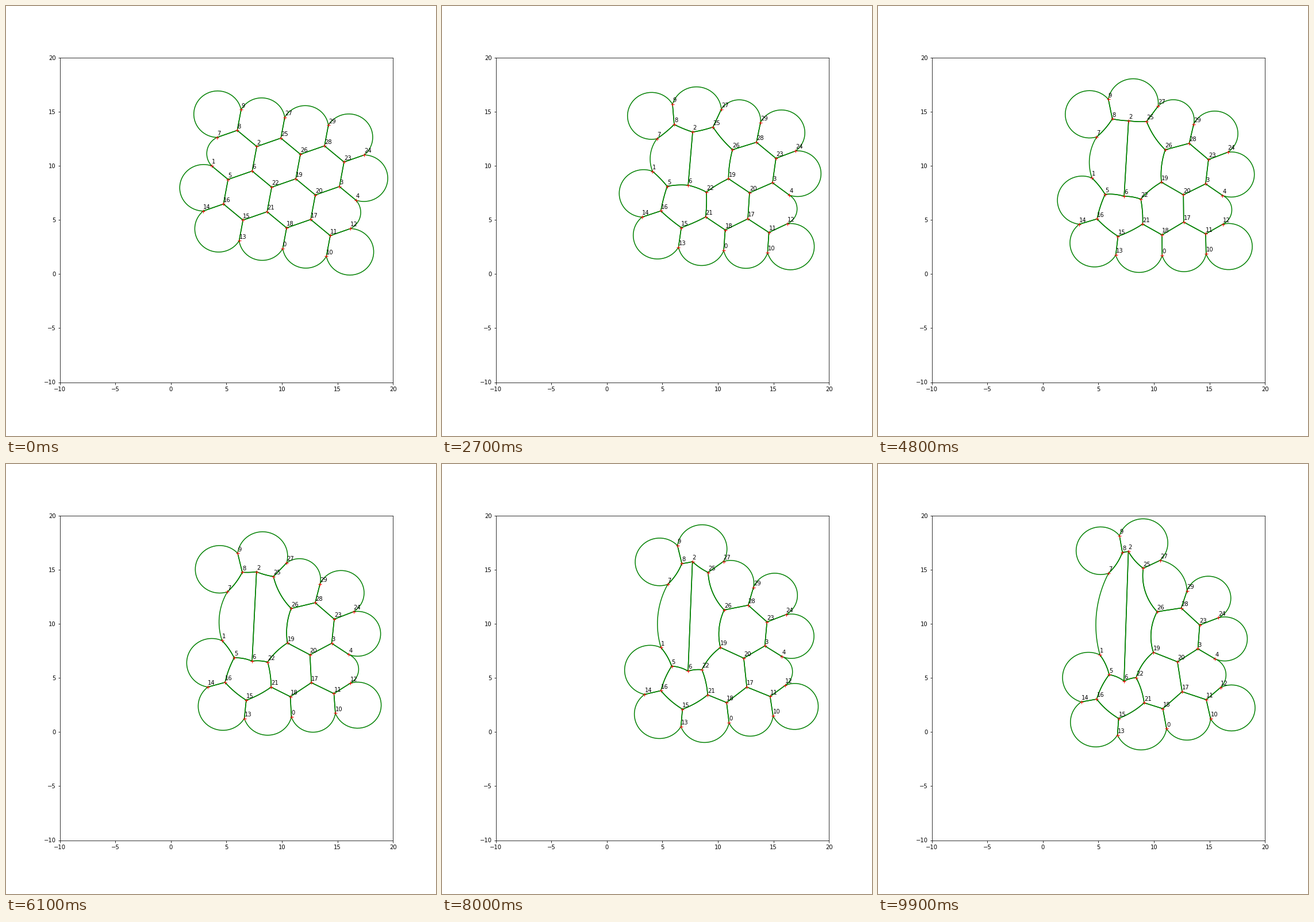
Animation, 748 px wide and 748 px high, one loop 10000 ms. Source, as a matplotlib script:

```python
import numpy as np
import matplotlib.pyplot as plt
from matplotlib.animation import FuncAnimation

SIZE, DPI, FRAMES = 748, 72, 100
SIDE, TILT = 2.305, np.radians(79.67)
CENTRE = 11.25 + 8.80j
STUB = .84              # length of the open edges on the rim, in sides
CELL_AREA = 14.25
PRESSURE = .5
PULLED = (2, 6)         # this pair is dragged apart at constant speed

# The three edge directions of the honeycomb.
up, right_down, left = SIDE * np.exp(1j * (TILT + np.radians([0, -120, 120])))
directions = (up, right_down, left)
column = right_down - left

# Two interleaved 3 x 3 grids of junctions, then the stubs around them.
even_rows = [((8, 25, 28), up - right_down), ((6, 19, 3), 0),
             ((16, 21, 17), left - up)]
odd_rows = [((2, 26, 23), up), ((5, 22, 20), left),
            ((15, 18, 11), left - up + right_down)]
stubs = [(8, 9, up), (25, 27, up), (28, 29, up), (15, 13, -up), (18, 0, -up),
         (11, 10, -up), (8, 7, left), (16, 14, left), (23, 24, -left),
         (11, 12, -left), (3, 4, right_down), (5, 1, -right_down)]

start = np.zeros(30, complex)
centres = []
for rows, sign in ((even_rows, -1), (odd_rows, 1)):
    for names, offset in rows:
        for k, name in enumerate(names):
            start[name] = CENTRE + offset + (k - 1) * column
            centres += [start[name] + sign * d for d in directions]
for base, tip, step in stubs:
    start[tip] = start[base] + STUB * step

# Where each junction comes to rest.
end = np.array([
    11.14 + .31j, 5.14 + 7.13j, 7.70 + 16.69j, 13.96 + 7.69j, 15.51 + 6.76j,
    5.97 + 5.30j, 7.31 + 4.71j, 5.91 + 14.67j, 7.16 + 16.61j, 6.90 + 18.15j,
    15.10 + 1.24j, 14.71 + 2.99j, 15.98 + 4.10j, 6.72 - .28j, 3.46 + 2.78j,
    6.82 + 1.26j, 4.85 + 3.04j, 12.54 + 3.73j, 10.80 + 2.16j, 9.95 + 7.37j,
    12.12 + 6.49j, 9.12 + 2.70j, 8.40 + 5.03j, 14.12 + 9.89j, 15.82 + 10.56j,
    9.04 + 15.13j, 10.29 + 11.12j, 10.57 + 15.87j, 12.46 + 11.46j,
    12.98 + 13.05j])

# A cell is the clockwise loop of junctions around one honeycomb centre.
loops = {}
for c in centres:
    near = np.flatnonzero(abs(start - c) < 1.2 * SIDE)
    loop = [int(i) for i in near[np.argsort(-np.angle(start[near] - c))]]
    loops[frozenset(loop)] = loop
cells = list(loops.values())


def edges(cell):
    return list(zip(cell, cell[1:] + cell[:1]))


owner = {edge: k for k, cell in enumerate(cells) for edge in edges(cell)}


def junctions(t):
    """Straight drift, plus two swings that fade out again."""
    sway = .015 * (1 - np.exp(-4 * t) - t * (1 - np.exp(-4))) / .38
    curl = .2 * 4 * t * (1 - t)
    pts = start + (end - start) * t
    swing = 1j * sway * (start - (-14.2 + 12.5j))
    corner = [7, 8, 9, 25]
    swing[corner] += 1j * curl * (start[corner] - (10.26 + 11.86j))
    swing[list(PULLED)] = 0
    return pts + swing


def pressure(cell, t):
    """Cells along the pulled wall slacken, the one below is squeezed."""
    slack = np.exp(-t / .6)
    if all(p in cell for p in PULLED):
        return PRESSURE * slack
    if PULLED[1] in cell:
        return PRESSURE * (1 + .7 * (1 - slack))
    return PRESSURE


def segment(half):
    """Area of a circular segment on a chord of length 2."""
    return (half - np.sin(half) * np.cos(half)) / np.sin(half) ** 2


half_grid = np.linspace(.01, 3, 3000)
area_grid = segment(half_grid)


def arc(a, b, half, n=40):
    """Arc from a to b, bulging left, sweeping twice `half`."""
    r = abs(b - a) / 2 / np.sin(half)
    ang = np.linspace(-half, half, n)
    along = (b - a) / abs(b - a)
    return (a + b) / 2 + along * r * (np.sin(ang)
                                      + 1j * (np.cos(ang) - np.cos(half)))


def outline(k, pts, press):
    """Walls bend with the pressure step; a free rim closes off the area."""
    cell = cells[k]
    z = pts[cell]
    room = CELL_AREA + np.sum(np.conj(z) * np.roll(z, -1)).imag / 2
    halves, rim = {}, None
    for a, b in edges(cell):
        reach = abs(pts[b] - pts[a]) / 2
        other = owner.get((b, a))
        if other is None:
            rim = (a, b)
            halves[rim] = np.arcsin(press[k] * reach)
            continue
        half = np.arcsin((press[k] - press[other]) / 2 * reach)
        if abs(half) < 1e-5:
            half = 1e-5
        halves[a, b] = half
        room -= segment(half) * reach ** 2
    if rim and press[k] == PRESSURE:
        reach = abs(pts[rim[1]] - pts[rim[0]]) / 2
        halves[rim] = np.interp(room / reach ** 2, area_grid, half_grid)
    return np.concatenate([arc(pts[a], pts[b], h)
                           for (a, b), h in halves.items()])


fig = plt.figure(figsize=(SIZE / DPI, SIZE / DPI), dpi=DPI, facecolor="white")
fig.subplots_adjust(left=.125, right=.9, bottom=.125, top=.88)
ax = fig.add_subplot()
ax.set(xlim=(-10, 20), ylim=(-10, 20))

lines = [ax.plot([], [], "g", lw=1.5)[0] for _ in cells]
marks, = ax.plot([], [], "r+", ms=6)
labels = [ax.text(0, 0, str(i), fontsize=10) for i in range(len(start))]


def update(frame):
    t = frame / (FRAMES - 1)
    pts = junctions(t)
    press = [pressure(cell, t) for cell in cells]
    for k, line in enumerate(lines):
        z = outline(k, pts, press)
        line.set_data(z.real, z.imag)
    marks.set_data(pts.real, pts.imag)
    for label, p in zip(labels, pts):
        label.set_position((p.real, p.imag + .2))
    return [*lines, marks, *labels]


anim = FuncAnimation(fig, update, frames=FRAMES, interval=100, repeat=True)
plt.show()
```
